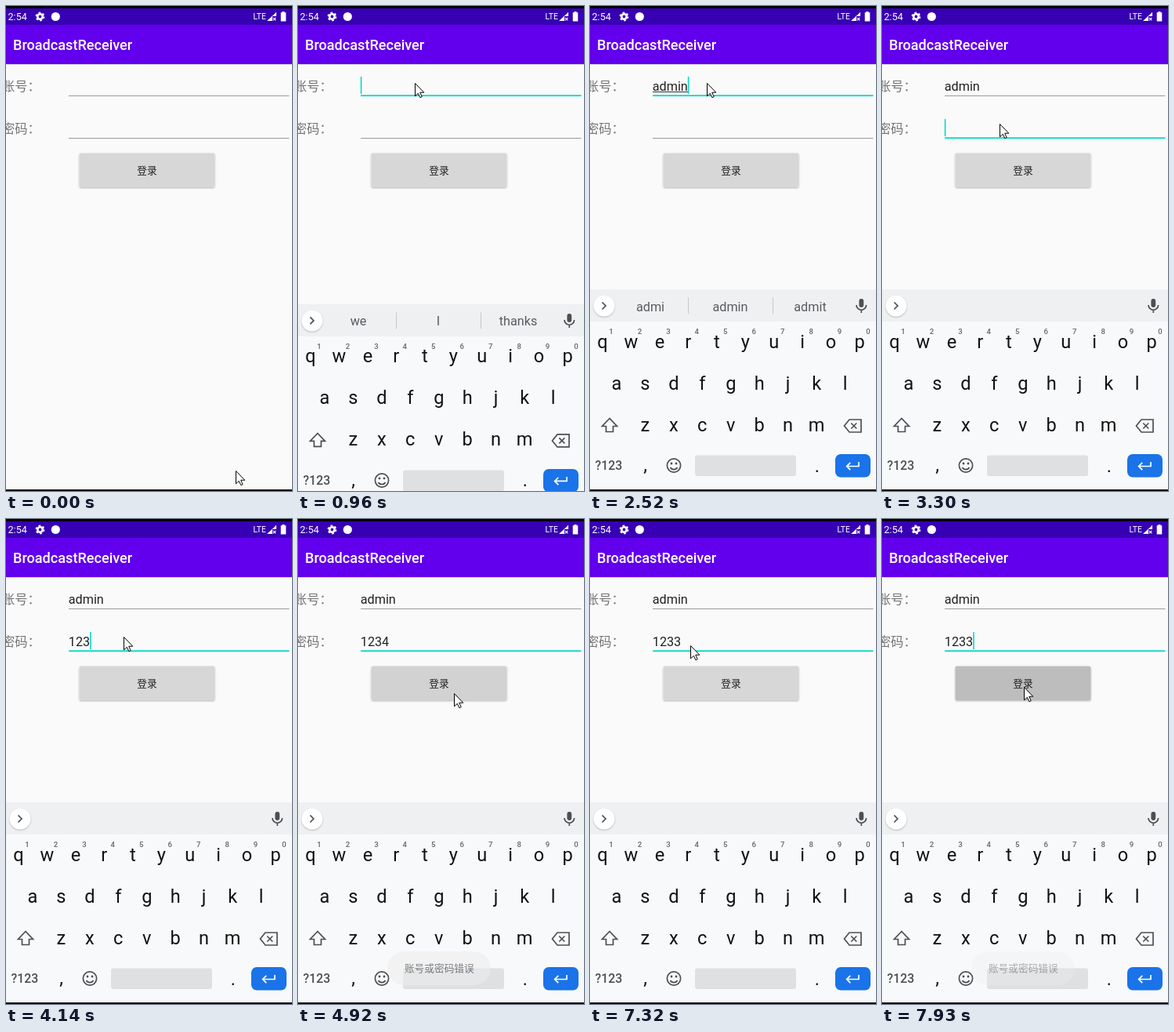
Animation, 365 px wide and 618 px high, one loop 8 s. Source, as an HTML page:

```html
<!DOCTYPE html>
<html lang="zh-CN">
<head>
<meta charset="utf-8">
<title>Login form</title>
<style>
  html, body { margin: 0; width: 100%; height: 100%; overflow: hidden; background: #fafafa; }
  svg { display: block; width: 365px; height: 618px; font-family: Roboto, "Noto Sans CJK SC", "Noto Sans CJK", sans-serif; }
  text { white-space: pre; }
  .line { fill: none; stroke: #4b5054; stroke-width: 1.7; }
</style>
</head>
<body>
<svg viewBox="0 0 365 618">
  <defs>
    <filter id="soft" x="-20%" y="-20%" width="140%" height="150%">
      <feDropShadow dx="0" dy="1" stdDeviation="1" flood-opacity=".28"/>
    </filter>
  </defs>
  <rect width="365" height="618" fill="#fafafa"/>
  <rect y="72" width="365" height="2" fill="#6200ee" filter="url(#soft)"/>
  <rect width="365" height="3"/>
  <rect y="3" width="365" height="21" fill="#3700b3"/>
  <rect y="24" width="365" height="50" fill="#6200ee"/>
  <rect y="616" width="365" height="2"/>

  <g id="status" fill="#fff">
    <text x="2.5" y="18" font-size="12.6">2:54</text>
    <circle cx="43.5" cy="13.5" r="3.2" fill="none" stroke="#fff" stroke-width="2.6"/>
    <circle cx="43.5" cy="13.5" r="5" fill="none" stroke="#fff" stroke-width="1.8" stroke-dasharray="2.7 2.536"/>
    <circle cx="63.3" cy="13.5" r="5.6"/>
    <text x="315.5" y="17.3" font-size="10.4">LTE</text>
    <path d="M333 19L345 8V13H340V19Z"/>
    <path d="M344.5 8.5V13M340.8 14.8l3.6 3.6m0-3.6l-3.6 3.6" stroke="#fff" stroke-width="1.1"/>
    <path d="M352.5 7h3v1.3h1.8V19.5h-6.6V8.3h1.8z"/>
    <text x="9" y="56" font-size="18.1" font-weight="500">BroadcastReceiver</text>
  </g>

  <g font-size="16.3" fill="#757575">
    <text x="-5" y="108">账号：</text>
    <text x="-5" y="162">密码：</text>
  </g>
  <g font-size="16.2" fill="#212121">
    <text id="account" x="79.8" y="107.5"></text>
    <text id="password" x="79.8" y="161.5"></text>
  </g>
  <rect id="compose" x="80" y="109" height="1" fill="#333"/>
  <rect id="bar1" x="80" width="281.5"/>
  <rect id="bar2" x="80" width="281.5"/>
  <rect id="caret" width="1.6" height="22" fill="#03dac5"/>

  <rect id="button" x="93.5" y="187.5" width="173" height="43.5" rx="2" filter="url(#soft)"/>
  <text x="180" y="214" font-size="12.7" text-anchor="middle" fill="#212121">登录</text>

  <g id="keyboard">
    <rect y="361" width="365" height="255" fill="#f8f9fb"/>
    <rect y="361" width="365" height="41" fill="#eff0f2"/>
    <circle cx="18" cy="382" r="13.3" fill="#fff" filter="url(#soft)"/>
    <path class="line" d="M15.5 377.5l4.5 4.5-4.5 4.5"/>
    <rect x="343.4" y="373" width="5.8" height="11" rx="2.9" fill="#4b5054"/>
    <path class="line" d="M340 381a6.3 6.3 0 0 0 12.6 0M346.3 387.5v3.5"/>
    <path id="dividers" d="M125.5 371.5v21M233.5 371.5v21" stroke="#c6c8cb"/>
    <g id="words" font-size="16.2" text-anchor="middle" fill="#575b60">
      <text x="77" y="388.5"></text><text x="179" y="388.5"></text><text x="281" y="388.5"></text>
    </g>
    <g id="letters" font-size="23.6" text-anchor="middle" fill="#111"></g>
    <g id="hints" font-size="9.6" font-weight="500" text-anchor="middle" fill="#62666a"></g>
    <path class="line" d="M25 525.5l-9.5 10h5v7h9v-7h5z"/>
    <path class="line" d="M331 527h15v16h-15l-6.500-8zM333.300 531.500l7 7m0-7l-7 7"/>
    <text x="6.500" y="591.200" font-size="15.800" font-weight="500" fill="#4b5054">?123</text>
    <circle class="line" cx="107" cy="585.500" r="8.600"/>
    <path class="line" d="M102.500 588a5 4.500 0 0 0 9 0"/>
    <circle cx="104" cy="583" r="1.400" fill="#4b5054"/>
    <circle cx="110" cy="583" r="1.400" fill="#4b5054"/>
    <rect x="134" y="572.500" width="129" height="26.500" rx="3" fill="#dee0e2"/>
    <rect x="313" y="571" width="45" height="29.500" rx="7" fill="#1a73e8"/>
    <path class="line" style="stroke:#fff" d="M343 581v5.500h-15M332.300 581.800l-4.700 4.700 4.700 4.700"/>
  </g>

  <g id="toast">
    <rect x="114" y="551" width="132" height="43" rx="21.500" fill="#eeeeee"/>
    <text x="180.300" y="577" font-size="12.700" text-anchor="middle" fill="#212121">账号或密码错误</text>
  </g>
  <path id="pointer" d="M.5.5V16.800L4.300 13.300 6.900 18.700 9.200 17.600 6.700 12.200H11.800Z" fill="#fff" stroke="#000"/>
</svg>
<script>
const LOOP = 8000;
const $ = id => document.getElementById(id);
const set = (el, attrs) => { for (const k in attrs) el.setAttribute(k, attrs[k]); };

function addText(parent, str, x, y) {
  const el = document.createElementNS("http://www.w3.org/2000/svg", "text");
  set(el, { x, y });
  el.textContent = str;
  parent.append(el);
}

const PITCH = 36.45;
[["qwertyuiop", 16, 435.5], ["asdfghjkl", 34, 488.5], ["zxcvbnm", 70.3, 541.5]].forEach(([row, x, y]) =>
  [...row].forEach((ch, i) => addText($("letters"), ch, x + i * PITCH, y)));
addText($("letters"), ",", 70.5, 593);
addText($("letters"), ".", 289.8, 593.5);
[..."1234567890"].forEach((ch, i) => addText($("hints"), ch, 27 + i * PITCH, 418));

// Bursts of motion: start, end, number of picture steps.
const BURSTS = [[70, 730, 10], [890, 1110, 4], [2900, 3130, 4], [4310, 5080, 11],
  [5150, 5920, 11], [6840, 7150, 5], [7320, 7930, 9]];

const POINTER = [[60, 293, 592], [250, 250, 430], [450, 185, 190], [600, 153, 82], [730, 149, 98],
  [2820, 149, 98], [3130, 150, 150], [4380, 150, 150], [4690, 199, 222], [5120, 199, 222],
  [5400, 286, 215], [5700, 230, 165], [5920, 165, 151], [7260, 165, 151],
  [7430, 60, 180], [7620, 150, 212], [7720, 181, 214]];
const TOAST = [[4750, 0], [5070, 1], [6800, 1], [7150, 0], [7833, 0], [7930, .35]];
const PRESS = [[4600, 0], [4700, 1], [4780, 1], [4960, 0], [7760, 0], [7860, 1]];

const ACCOUNT = [[0, ""], [1430, "a"], [1660, "ad"], [1890, "adm"], [2140, "admi"], [2290, "admin"]];
const PASSWORD = [[0, ""], [3680, "1"], [3910, "12"], [4140, "123"], [4310, "1234"], [6610, "123"], [6840, "1233"]];
const WORDS = [[0, "we I thanks"], [1660, "a and all"], [1890, "ad and add"], [2140, "adm admin adds"],
  [2370, "admi admin admit"], [2600, "admin administer administers"], [3300, ""],
  [3450, "we I thanks"], [3910, ""]];
const CARET = [[0, false], [890, true], [2900, false], [3300, true], [4850, false], [5300, true],
  [5850, false], [6380, true], [7320, false], [7850, true]];
const FOCUS = [[0, 0], [730, 1], [3300, 2]];

const stepAt = (table, t) => table.findLast(row => row[0] <= t)[1];

function tween(keys, t) {
  const i = keys.findIndex(k => k[0] > t);
  if (i === 0) return keys[0].slice(1);
  if (i < 0) return keys.at(-1).slice(1);
  const a = keys[i - 1], b = keys[i], p = (t - a[0]) / (b[0] - a[0]);
  return a.slice(1).map((v, j) => v + (b[j + 1] - v) * p);
}

// Time of the latest picture step.
function snap(t) {
  const burst = BURSTS.findLast(b => b[0] <= t);
  if (!burst) return 0;
  const [from, to, count] = burst, gap = (to - from) / (count - 1);
  return Math.min(to, from + Math.floor((t - from + 8) / gap) * gap);
}

function drawBar(el, y, on) {
  set(el, on ? { y: y - .7, height: 1.8, fill: "#03dac5" } : { y, height: 1, fill: "#9b9b9b" });
}

function draw(t) {
  const m = snap(t), focus = stepAt(FOCUS, t);
  const account = $("account"), password = $("password");
  account.textContent = stepAt(ACCOUNT, t);
  password.textContent = stepAt(PASSWORD, t);

  const accountWidth = account.getComputedTextLength();
  const width = focus === 2 ? password.getComputedTextLength() : accountWidth;
  set($("compose"), { width: t < 3300 ? accountWidth : 0 });
  set($("caret"), { x: 79.8 + width, y: focus === 2 ? 144 : 90, opacity: +stepAt(CARET, t) });
  drawBar($("bar1"), 114, focus === 1);
  drawBar($("bar2"), 168, focus === 2);

  const [press] = tween(PRESS, m);
  const [r, g, b] = [214, 215, 214].map(v => Math.round(v - 26 * press));
  set($("button"), { fill: `rgb(${r},${g},${b})` });

  const left = Math.max(0, 1 - (m - 840) / 260);
  const drop = t < 890 ? 260 : 255 * left ** 4.04;
  set($("keyboard"), { transform: `translate(0 ${drop})` });
  const words = stepAt(WORDS, t).split(" ");
  [...$("words").children].forEach((el, i) => { el.textContent = words[i] || ""; });
  set($("dividers"), { opacity: words.length > 1 ? 1 : 0 });

  set($("toast"), { opacity: tween(TOAST, m)[0] });
  const [x, y] = tween(POINTER, m);
  set($("pointer"), { transform: `translate(${Math.round(x)} ${Math.round(y)})` });
}

function loop() {
  draw(performance.now() % LOOP);
  requestAnimationFrame(loop);
}
loop();
</script>
</body>
</html>
```
